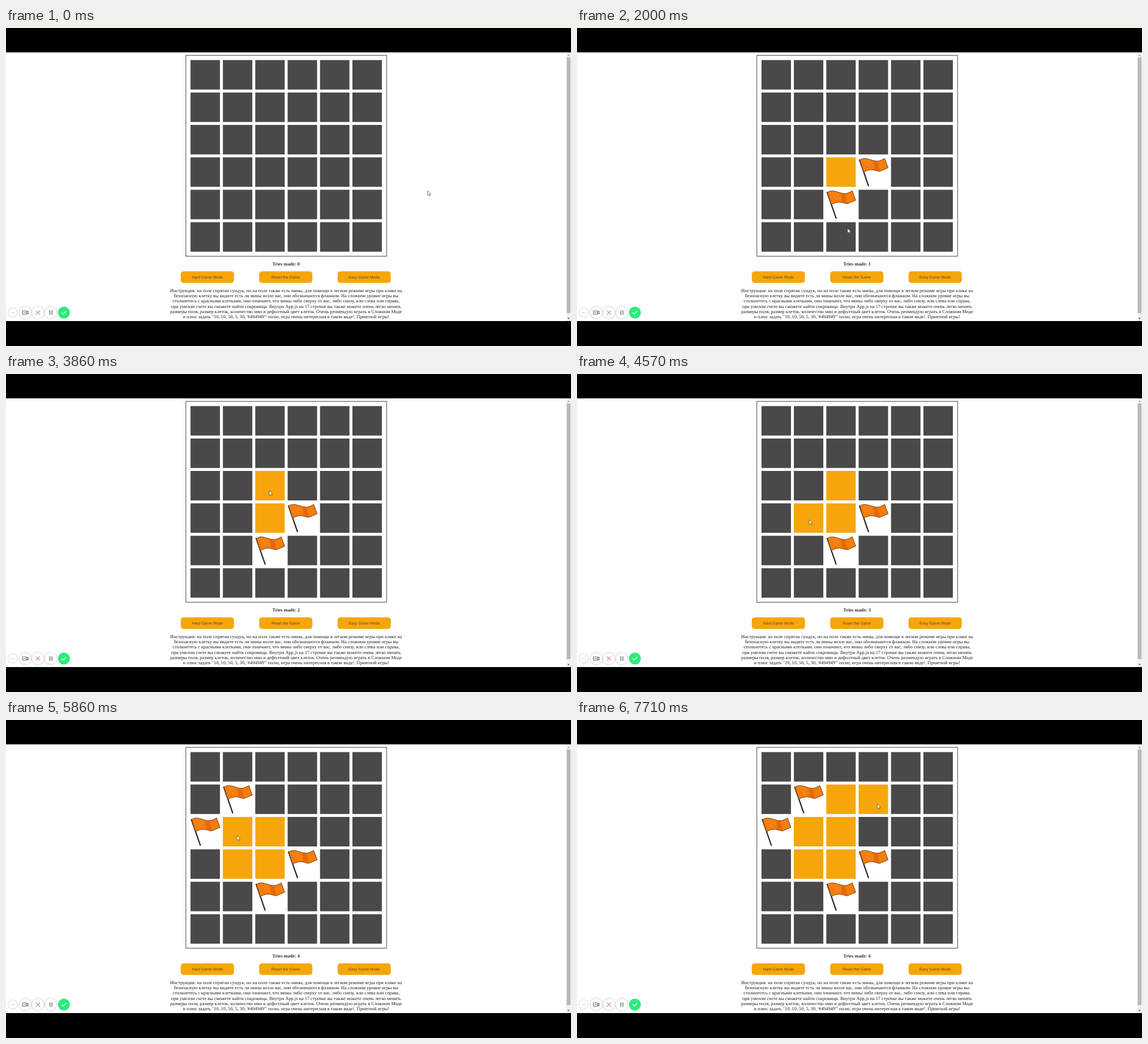
Recreate the animation shown at these times as an HTML page. Size 998 by 561 pixels, loop 8000 ms.

```html
<!DOCTYPE html>
<html lang="ru">
<head>
<meta charset="utf-8">
<title>Treasure field</title>
<style>
  html, body { margin: 0; width: 100%; height: 100%; overflow: hidden; background: #000; }
  svg { display: block; width: 998px; height: 561px; }
  text { text-anchor: middle; text-rendering: geometricPrecision; }
  .serif { font: 8.32px "Liberation Serif", "Times New Roman", serif; fill: #1c1c1c; }
  .tries { font-weight: bold; fill: #2c2c2c; }
  .label { font: 6.93px "Liberation Sans", Arial, sans-serif; fill: #5d481c; }
  .cell { fill: #4a484a; }
  .open { fill: #f6a60a; }
  .bubble { fill: #fff; filter: drop-shadow(0 .5px 1.5px rgba(0, 0, 0, .32)); }
  .icon { fill: none; stroke: #6c6c6c; stroke-width: 1.1; stroke-linecap: round; stroke-linejoin: round; }
</style>
</head>
<body>
<svg viewBox="0 0 998 561">
  <defs>
    <g id="flag">
      <path d="M1.6 4.6L17.3 50" stroke="#262322" stroke-width="2.2" stroke-linecap="round"/>
      <path d="M2 5C6 .8 12 1.600 18 3.200S29 7 34 6.600C38 6.200 42 4 46 1.800L52 18.400C47 21 42 22.500 37 24.800C31 24 26 21 20 22C15 22.800 12 24.500 8.800 26Z"
        fill="#f57d0b" stroke="#5c3411" stroke-width=".9" stroke-linejoin="round"/>
      <path d="M24 5C27 7 31 7 34 7C34 13 37 19 37.500 24C33 23 29 21.800 26.500 21.500C29 15 27 9 24 5Z" fill="#e5690a"/>
      <path d="M10 3.500L20 18M16 4L22 13" stroke="#fb9f49" stroke-width=".8"/>
    </g>
  </defs>

  <rect y="43" width="998" height="474" fill="#fff"/>

  <g id="scrollbar">
    <rect x="989.500" y="43" width="8.500" height="474" fill="#f1f1f1"/>
    <rect x="990.500" y="52" width="6.500" height="451" fill="#b9b9b9"/>
    <path d="M991.700 49.300l2-2.400 2 2.400z" fill="#8a8a8a"/>
    <path d="M991.700 511.500l2 2.400 2-2.400z" fill="#505050"/>
  </g>

  <rect x="317.700" y="48.300" width="354.600" height="354.300" fill="none" stroke="#444"/>
  <g id="board"></g>
  <text id="tries" class="serif tries" x="494.700" y="418.600"></text>
  <g id="buttons"></g>
  <g id="help"></g>

  <g id="recorder">
    <circle class="bubble" cx="11.800" cy="502" r="7.500"/>
    <circle class="bubble" cx="34" cy="502" r="10.300"/>
    <circle class="bubble" cx="56.500" cy="502" r="10.300"/>
    <circle class="bubble" cx="79.300" cy="502" r="10.300"/>
    <circle cx="102.300" cy="502" r="10.500" fill="#2bec7a"/>
    <path class="icon" d="M8.800 502h.1M11.800 502h.1M14.800 502h.1"/>
    <path class="icon" d="M29 499h7v6h-7zM36 501.300l3-1.800v5l-3-1.800M31 502h3"/>
    <path class="icon" d="M53.200 498.700l6.600 6.600M59.800 498.700l-6.600 6.600" style="stroke:#d9757b"/>
    <path class="icon" d="M77.500 498.500v7M81.100 498.500v7" style="stroke-width:1.400"/>
    <path class="icon" d="M98.600 502.200l2.600 2.500 4.800-5" style="stroke:#fff;stroke-width:1.400"/>
  </g>

  <path id="cursor" d="M0 0V8.200L1.900 6.600L3.200 9.400L4.600 8.800L3.400 6H5.800Z"
    fill="#fff" stroke="#444" stroke-width=".7" stroke-linejoin="round"/>
</svg>
<script>
const SVG = 'http://www.w3.org/2000/svg';
const LOOP = 8000, TICK = 1000 / 7, SIZE = 6, PITCH = 57.2, SIDE = 52;
const LEFT = 325.9, TOP = 56.600, MIDDLE = 494.700;
const $ = id => document.getElementById(id);

function add(parent, tag, attrs, text) {
  const el = document.createElementNS(SVG, tag);
  for (const name in attrs) el.setAttribute(name, attrs[name]);
  if (text) el.textContent = text;
  return parent.appendChild(el);
}

// Clicks: tick, opened cell [column, row], flagged neighbours
const clicks = [
  { at: 6, cell: [2, 3], flags: [[3, 3], [2, 4]] },
  { at: 26, cell: [2, 2], flags: [] },
  { at: 31, cell: [1, 3], flags: [] },
  { at: 37, cell: [1, 2], flags: [[1, 1], [0, 2]] },
  { at: 45, cell: [2, 1], flags: [] },
  { at: 53, cell: [3, 1], flags: [] }
];

// Cursor stops: tick, x, y
const path = [
  [0, 745, 287], [5, 467, 260], [10, 467, 260], [17, 485, 414], [19, 485, 412],
  [21, 481.500, 386], [25, 465, 206], [27, 465, 206], [31, 410, 257], [34, 410, 257],
  [37, 408, 204], [41, 408, 204], [44, 466, 150], [46, 466, 150], [49, 552, 143],
  [51, 552, 143], [53, 530.500, 148], [56, 530.500, 148]
];

const cells = [], flags = [];
for (let i = 0; i < SIZE * SIZE; i++) {
  const x = LEFT + i % SIZE * PITCH, y = TOP + Math.floor(i / SIZE) * PITCH;
  cells.push(add($('board'), 'rect', { x, y, width: SIDE, height: SIDE }));
  flags.push(add($('board'), 'use', { href: '#flag', x, y }));
}

['Hard Game Mode', 'Reset the Game', 'Easy Game Mode'].forEach((name, i) => {
  const x = MIDDLE - .5 + (i - 1) * 138.500;
  add($('buttons'), 'rect', { x: x - 47, y: 429.200, width: 94, height: 20.600, rx: 5, fill: '#f6a60a' });
  add($('buttons'), 'text', { class: 'label', x, y: 442 }, name);
});

[
  'Инструкция: на поле спрятан сундук, но на поле также есть мины, для помощи в легком режиме игры при клике на',
  'безопасную клетку вы видите есть ли мины возле вас, они обозначаются флажком. На сложном уровне игры вы',
  'столкнетесь с красными клетками, они означают, что мины либо сверху от вас, либо снизу, или слева или справа,',
  'при умелом счете вы сможете найти сокровища. Внутри App.js на 17 строчке вы также можете очень легко менять',
  'размеры поля, размер клеток, количество мин и дефолтный цвет клеток. Очень реомендую играть в Сложном Моде',
  'и плюс задать "10, 10, 50, 5, 30, \'#494949\'" полю, игра очень интересная в таком виде!. Приятной игры!'
].forEach((line, i) =>
  add($('help'), 'text', { class: 'serif', x: MIDDLE, y: 465.600 + i * 9.360 }, line));

function cursorAt(tick) {
  const n = Math.max(1, path.findIndex(stop => stop[0] >= tick));
  const [t0, x0, y0] = path[n - 1], [t1, x1, y1] = path[n];
  const p = (tick - t0) / (t1 - t0), e = p * p * (3 - 2 * p);
  return [x0 + (x1 - x0) * e, y0 + (y1 - y0) * e];
}

function draw(tick) {
  const done = clicks.filter(c => c.at <= tick);
  const index = ([col, row]) => row * SIZE + col;
  const open = new Set(done.map(c => index(c.cell)));
  const flagged = new Set(done.flatMap(c => c.flags.map(index)));
  cells.forEach((cell, i) => {
    cell.setAttribute('class', open.has(i) ? 'open' : 'cell');
    cell.style.display = flagged.has(i) ? 'none' : '';
    flags[i].style.display = flagged.has(i) ? '' : 'none';
  });
  $('tries').textContent = 'Tries made: ' + done.length;
  $('cursor').setAttribute('transform', `translate(${cursorAt(tick)})`);
}

let shown = -1;
function frame() {
  const tick = Math.min(55, Math.floor((performance.now() % LOOP + 4) / TICK));
  if (tick !== shown) draw(shown = tick);
  requestAnimationFrame(frame);
}
frame();
</script>
</body>
</html>
```
